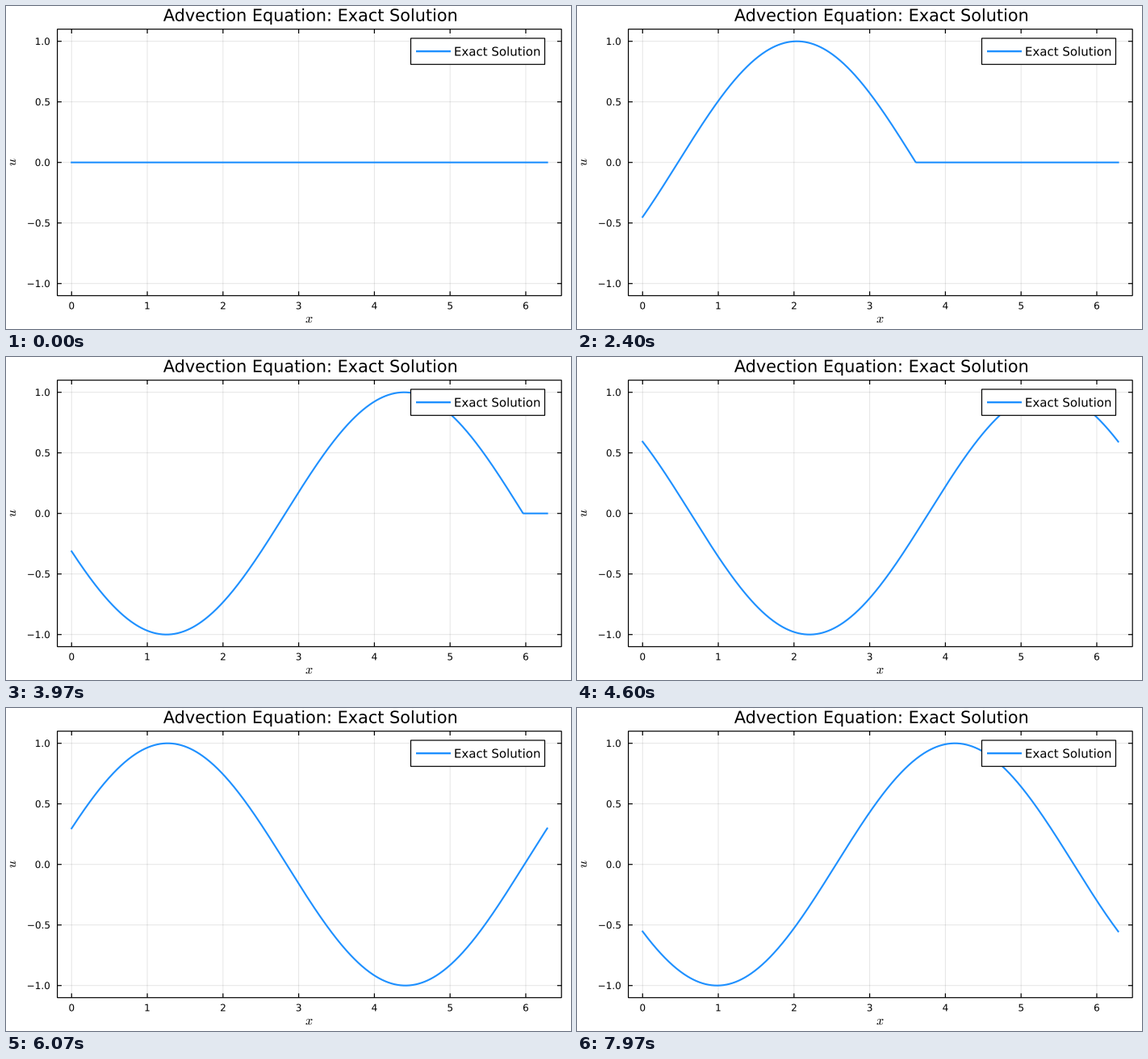
These frames come from a looping animation (700 px wide and 400 px high, 8000 ms). A matplotlib script:

```python
import numpy as np
import matplotlib.pyplot as plt
from matplotlib.animation import FuncAnimation
from matplotlib.collections import LineCollection
from matplotlib.patches import PathPatch, Rectangle
from matplotlib.textpath import TextPath
from matplotlib.transforms import Affine2D

W, H, DPI = 700, 400, 100
PT = 72 / DPI                     # points per pixel
TICK_MS, LOOP_MS = 10, 8000
STEP = 20 / 399                   # distance the wave travels per step
BLUE = "dodgerblue"
LEFT, RIGHT, TOP, BOTTOM = 63.6, 688.2, 28.7, 358.7
PAD = 0.03 * 2 * np.pi
X_LO, X_HI, Y_MAX = -PAD, 2 * np.pi + PAD, 1.1
ALIGN = {"left": 0, "center": 0.5, "right": 1}

plt.rcParams["font.family"] = "DejaVu Sans"
plt.rcParams["mathtext.fontset"] = "cm"

# One full-figure axes measured in pixels from the top left
fig = plt.figure(figsize=(W / DPI, H / DPI), dpi=DPI, facecolor="white")
ax = fig.add_axes([0, 0, 1, 1])
ax.set_xlim(0, W)
ax.set_ylim(H, 0)
ax.axis("off")


def px_x(v):
    return LEFT + (v - X_LO) / (X_HI - X_LO) * (RIGHT - LEFT)


def px_y(v):
    return TOP + (Y_MAX - v) / (2 * Y_MAX) * (BOTTOM - TOP)


def label(x, y, text, size, align="center", angle=0):
    """Text with its ink aligned to x and its baseline on y."""
    path = TextPath((0, 0), text, size=size)
    box = path.get_extents()
    shift = box.x0 + ALIGN[align] * box.width
    place = Affine2D().translate(-shift, 0).scale(1, -1).rotate_deg(-angle).translate(x, y)
    ax.add_patch(PathPatch(place.transform_path(path), facecolor="black",
                           linewidth=0, zorder=6, snap=False))


def lines(segments, width, color, z, **kw):
    group = LineCollection(segments, linewidths=width * PT, colors=color, zorder=z, **kw)
    group.set_snap(False)
    ax.add_collection(group, autolim=False)


def frame(left, top, right, bottom, z, fill):
    ax.add_patch(Rectangle((left, top), right - left, bottom - top, facecolor=fill,
                           edgecolor="black", linewidth=1.2 * PT, zorder=z, snap=False))


# Axes, ticks and grid
grid, ticks = [], []
for v in range(7):
    x = px_x(v)
    grid.append([(x, TOP), (x, BOTTOM)])
    ticks += [[(x, TOP), (x, TOP + 5.3)], [(x, BOTTOM), (x, BOTTOM - 5.3)]]
    label(x, 375.4, str(v), 12)
for v in np.linspace(-1, 1, 5):
    y = px_y(v)
    grid.append([(LEFT, y), (RIGHT, y)])
    ticks += [[(LEFT, y), (LEFT + 5.3, y)], [(RIGHT, y), (RIGHT - 5.3, y)]]
    label(54, y + 4.4, f"{v:.1f}".replace("-", "\u2212"), 12, "right")
lines(grid, 1, (0, 0, 0, 0.1), 1)
lines(ticks, 1.2, "black", 2)
frame(LEFT, TOP, RIGHT, BOTTOM, 2, "none")

label(376.5, 18.7, "Advection Equation: Exact Solution", 20.8)
label(375.5, 392.2, "$x$", 16.3)
label(12.1, px_y(0), "$u$", 16.3, angle=90)

# Legend
frame(501.5, 40, 667.5, 72.3, 4, "white")
lines([[(508, 56.1), (551, 56.1)]], 2.4, BLUE, 5)
label(556.4, 61.6, "Exact Solution", 15, "left")

# Travelling wave entering from the left
xs = np.linspace(0, 2 * np.pi, 630)
curve, = ax.plot(px_x(xs), px_y(0 * xs), color=BLUE, linewidth=2.1 * PT, zorder=3,
                 solid_capstyle="projecting", snap=False)


def update(i):
    # 30 steps a second, each starting on the nearest 10 ms
    step = (6 * i + 3) // 20
    front = step * STEP
    curve.set_ydata(px_y(np.where(xs < front, np.sin(front - xs), 0)))
    return curve,


anim = FuncAnimation(fig, update, frames=LOOP_MS // TICK_MS, interval=TICK_MS,
                     repeat=True, repeat_delay=0)
plt.show()
```
